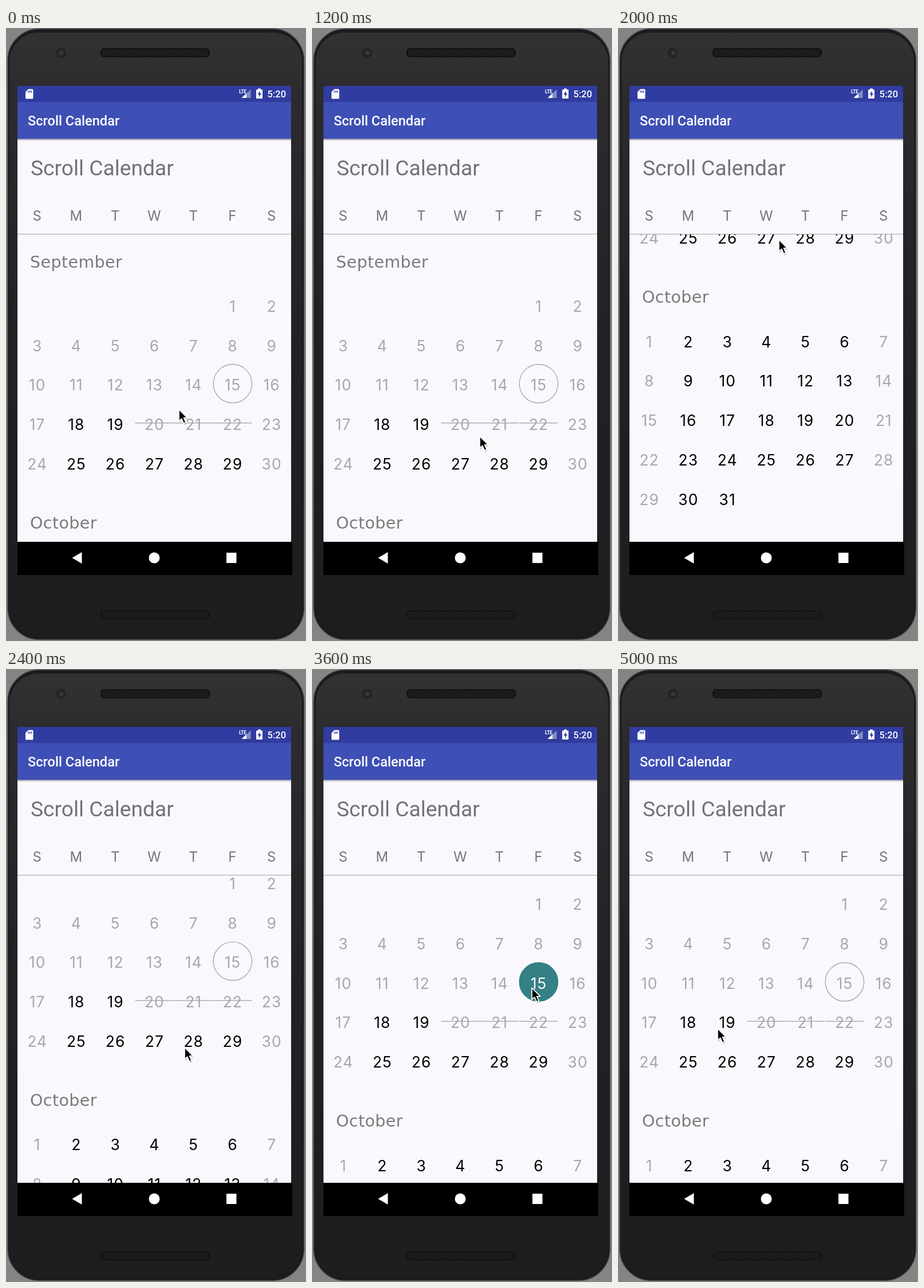
These frames come from a looping animation (524x1069 px, 5100 ms). An HTML page:

```html
<!DOCTYPE html>
<html lang="en">
<head>
<meta charset="utf-8">
<title>Scroll Calendar</title>
<style>
  html, body { margin: 0; width: 100%; height: 100%; overflow: hidden; background: #858384; }
  svg { display: block; width: 100vw; height: 100vh; }
  text { font-family: Roboto, sans-serif; }
  .cal text { font-family: Inter, sans-serif; font-weight: 400; }
  .mid { text-anchor: middle; }
  .day { font-size: 26.5px; letter-spacing: 1px; }
  .head { font-size: 24px; fill: #757477; }
  .cal .month { font-family: "DejaVu Sans", sans-serif; font-size: 28.5px; letter-spacing: .4px; fill: #7a797c; }
</style>
</head>
<body>
<svg viewBox="0 0 524 1069">
  <defs>
    <linearGradient id="body" x2="0" y2="1">
      <stop offset="0" stop-color="#323133"/>
      <stop offset=".1" stop-color="#2c2b2d"/>
      <stop offset=".5" stop-color="#232124"/>
      <stop offset="1" stop-color="#1e1c1f"/>
    </linearGradient>
    <linearGradient id="shade" x2="0" y2="1">
      <stop offset="0" stop-opacity=".3"/>
      <stop offset="1" stop-opacity="0"/>
    </linearGradient>
    <pattern id="mesh" width="4" height="4" patternUnits="userSpaceOnUse">
      <path d="M0 0h2v2h-2zM2 2h2v2h-2z" fill="#242325"/>
    </pattern>
    <clipPath id="view"><path d="M20 360h478v536h-478z"/></clipPath>
  </defs>

  <rect x="3" y="1.5" width="517.5" height="1065" rx="55" fill="#1b1a1c" stroke="#454446" stroke-width="1.500"/>
  <rect x="6.500" y="8" width="510.500" height="1053" rx="50" fill="url(#body)"/>
  <circle cx="96" cy="43.5" r="9" fill="#242325"/>
  <circle cx="96.5" cy="43.5" r="4" fill="#363537"/>
  <g fill="#131214">
    <rect x="165" y="35" width="191" height="16" rx="6"/>
    <rect x="165" y="1016" width="191" height="15" rx="6"/>
  </g>
  <path d="M168 37h185v12h-185zM168 1018h185v11h-185z" fill="url(#mesh)"/>

  <path d="M20 101h478v853h-478z" fill="#faf8fc"/>
  <path d="M20 101h478v28h-478z" fill="#303c9f"/>
  <path d="M20 129h478v64.5h-478z" fill="#3e4fb5"/>
  <path d="M20 193.5h478v4h-478z" fill="url(#shade)"/>

  <g fill="#fff">
    <path d="M39 106.500h7q1.500 0 1.500 1.500v14q0 1.500-1.500 1.500h-10.500q-1.500 0-1.500-1.500v-10.500z"/>
    <path d="M39 109v4M41.700 109v4M44.400 109v4" stroke="#303c9f" stroke-width="1.300"/>
    <text x="407" y="114" font-size="8.500" font-weight="700" letter-spacing="-.4">LTE</text>
    <path d="M427.500 107v15h-16z" opacity=".4"/>
    <path d="M420 114v8h-8.500z"/>
    <path d="M440 107.500v-2h5v2h3v15.500h-11v-15.500z"/>
    <path d="M443.500 109.500l-4 6.500h2.500v4.500l4-6.500h-2.500z" fill="#303c9f"/>
    <text x="456.500" y="121" font-size="16.500" font-weight="500">5:20</text>
    <text x="38" y="170" font-size="23.600" font-weight="500">Scroll Calendar</text>
  </g>
  <text x="43" y="257" font-size="37.200" fill="#747276">Scroll Calendar</text>

  <g class="cal" id="names"></g>
  <g class="cal" clip-path="url(#view)"><g id="list"></g></g>
  <path d="M20 359.500h478" stroke="#a3a1a5" stroke-width="1.200"/>

  <path d="M20 896h480v58h-480z"/>
  <g fill="#fff">
    <path d="M115.500 924l17-10v20z"/>
    <circle cx="259" cy="924" r="9.500"/>
    <path d="M385 915h17.500v18h-17.500z"/>
  </g>

  <g id="cursor" stroke-linejoin="round">
    <path d="M0 0v20.500l4.700-4.200 3.600 8.200 3.900-1.700-3.600-8h6.200z" opacity=".25" transform="translate(1 2.500)"/>
    <path d="M0 0v20.500l4.700-4.200 3.600 8.200 3.900-1.700-3.600-8h6.200z" stroke="#fff" stroke-width="1.700"/>
  </g>
</svg>
<script>
const LOOP = 5100, STEP = 100, COL = 68.25, ROW = 68.7;
const $ = id => document.getElementById(id);
const colX = i => 20 + COL * (i + .5);

function add(parent, tag, attrs, text = '') {
  const el = document.createElementNS('http://www.w3.org/2000/svg', tag);
  for (const k in attrs) el.setAttribute(k, attrs[k]);
  el.textContent = text;
  parent.append(el);
  return el;
}

[...'SMTWTFS'].forEach((c, i) =>
  add($('names'), 'text', { x: colX(i), y: 335.5, class: 'mid head' }, c));

const taps = [];   // days that light up while selected

function month(name, top, firstCol, days, style) {
  add($('list'), 'text', { x: 42, y: top + 10.5, class: 'month' }, name);
  for (let d = 1; d <= days; d++) {
    const cell = d - 1 + firstCol, col = cell % 7;
    const x = colX(col), y = top + 78 + ROW * Math.floor(cell / 7);
    const { off, today, strike, tap } = style(d, col);
    const fill = off ? '#a9a7ab' : '#000';
    let disc;
    if (tap) {
      disc = add($('list'), 'circle', { cx: x + .5, cy: y - 2.2, r: 33.7, 'stroke-width': 1.3 });
    }
    const label = add($('list'), 'text', { x: x + .5, y: y + 9.8, class: 'mid day', fill }, d);
    if (strike) add($('list'), 'path', {
      d: `M${x - 33.3} ${y - 2.2}h67.3`, stroke: '#a09ea2', 'stroke-width': 1.2
    });
    if (tap) taps.push({ disc, label, fill, tap, ring: today ? '#a5a3a7' : 'none' });
  }
}

month('September', 407, 5, 30, (d, col) => ({
  off: d < 18 || col % 6 == 0 || (d > 19 && d < 23),
  today: d == 15,
  strike: d > 19 && d < 23,
  tap: { 15: [3400, 3800], 19: [4500, 4900] }[d]
}));
month('October', 862.3, 0, 31, (d, col) => ({ off: col % 6 == 0 }));

// time, pointer x, pointer y, scroll
const keys = [
  [0, 302, 665, 0], [600, 300, 662, 0], [900, 295, 753, 0], [1200, 293, 712, 0],
  [1300, 287, 640, 80], [1500, 273, 515, 205.5], [1600, 274, 452, 275],
  [1700, 276, 402, 344], [1800, 278, 380, 380], [2000, 281, 369, 393.3],
  [2100, 287, 425, 342], [2400, 312, 660, 110.7], [2500, 317, 697, 74.5],
  [2700, 326, 680, 74.5], [3000, 350, 577, 74.5], [3400, 384, 556, 74.5],
  [3800, 384, 556, 74.5], [4200, 186, 629, 74.5], [4500, 174, 627, 74.5],
  [LOOP, 174, 627, 74.5]
];

function pose(t) {
  const i = keys.findIndex(k => k[0] > t);
  const a = keys[i - 1], b = keys[i], f = (t - a[0]) / (b[0] - a[0]);
  return a.map((v, n) => v + (b[n] - v) * f);
}

function draw(now) {
  const t = Math.floor(now % LOOP / STEP) * STEP;
  const [, x, y, scroll] = pose(t);
  $('cursor').setAttribute('transform', `translate(${x} ${y})`);
  $('list').setAttribute('transform', `translate(0 ${-scroll})`);
  for (const { disc, label, fill, tap, ring } of taps) {
    const on = t >= tap[0] && t < tap[1];
    disc.setAttribute('fill', on ? '#348085' : 'none');
    disc.setAttribute('stroke', on ? '#348085' : ring);
    label.setAttribute('fill', on ? '#fff' : fill);
  }
  requestAnimationFrame(draw);
}
draw(performance.now());
</script>
</body>
</html>
```
